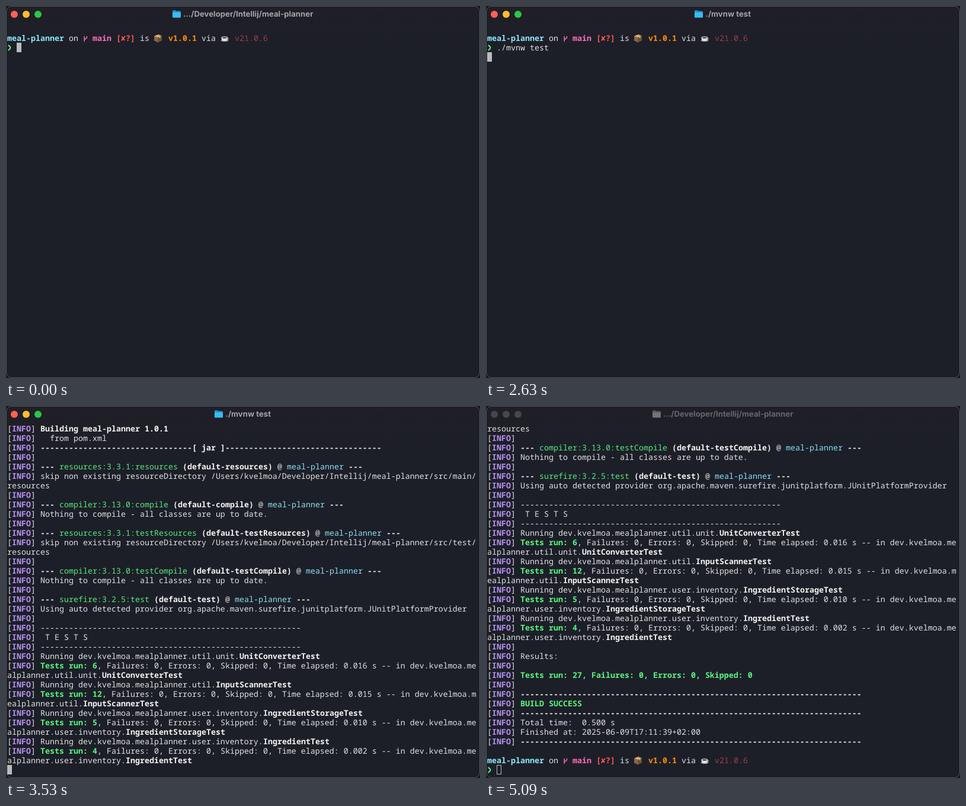
An HTML page that plays this animation: 800 by 628 pixels, repeating every 5140 ms.

```html
<!DOCTYPE html>
<html lang="en">
<head>
<meta charset="utf-8">
<title>Terminal test run</title>
<style>
  html, body { margin: 0; width: 100%; height: 100%; overflow: hidden; background: #15161b; }
  svg { display: block; width: 100vw; height: 100vh; }
  text { white-space: pre; text-rendering: geometricPrecision; font-variant-ligatures: none; }
  #term text { font: 13.3333px "Noto Sans Mono", "DejaVu Sans Mono", monospace; }
  #term text.bold { font-weight: 600; }
  #title { font: 700 13.2px Inter, "Open Sans", sans-serif; text-anchor: middle; }
</style>
</head>
<body>
<svg viewBox="0 0 800 628" xmlns="http://www.w3.org/2000/svg">
  <defs>
    <linearGradient id="bg" x1="0" y1="0" x2="0" y2="1">
      <stop offset="0" stop-color="#201e27"/>
      <stop offset=".1" stop-color="#1d1f28"/>
    </linearGradient>
    <g id="branch" fill="none" stroke="#ff6ac1" stroke-width="1.5">
      <path d="M132.2 51V60M136.5 51V52.5Q136.5 55 132.2 56.5"/>
    </g>
    <g id="parcel">
      <path d="M250 51 257 48 263 50.5V58L256.5 61.5 250 58.5Z" fill="#8a6543"/>
      <path d="M250 51 257 48 263 50.5 256.5 53.5Z" fill="#c69c6d"/>
      <path d="M256.5 53.5 263 50.5V58L256.5 61.5Z" fill="#6d4c31"/>
      <path d="M253 49.7 259.8 52V54.5" fill="none" stroke="#e2cba6" stroke-width="1.2"/>
    </g>
    <g id="cup">
      <ellipse cx="369" cy="58" rx="6.5" ry="2" fill="#a7a8a8"/>
      <path d="M363.5 53.5H374Q374 59 368.8 59T363.5 53.5Z" fill="#e4e4e2"/>
      <ellipse cx="368.8" cy="53.5" rx="5.3" ry="2.3" fill="#e4e4e2"/>
      <ellipse cx="368.8" cy="53.6" rx="3.9" ry="1.3" fill="#4b4743"/>
      <path d="M373.5 54Q376 54 375.5 55.5T372.8 57" fill="none" stroke="#d0d0ce"/>
    </g>
  </defs>
  <rect x=".5" y=".5" width="799" height="627" rx="9" fill="url(#bg)" stroke="#53555b"/>
  <circle class="light" cx="14" cy="14" r="6"/>
  <circle class="light" cx="34" cy="14" r="6"/>
  <circle class="light" cx="54" cy="14" r="6"/>
  <g id="folder">
    <path id="folderBack" d="M281 8.6Q281 7.2 282.4 7.2H286L287.5 8.6H293.6Q295 8.6 295 10V18.2Q295 19.6 293.6 19.6H282.4Q281 19.6 281 18.2Z"/>
    <path id="folderFront" d="M281 10.8H295V18.2Q295 19.6 293.6 19.6H282.4Q281 19.6 281 18.2Z"/>
  </g>
  <text id="title" x="408.8" y="18"></text>
  <g id="term"></g>
  <rect id="cursor"/>
</svg>
<script>
const LOOP = 5140, CELL = 8, LINE = 16, LEFT = 2, TOP = 30, COLS = 99, ROWS = 37;
const NS = "http://www.w3.org/2000/svg";
const $ = id => document.getElementById(id);

// Style keys: upper case is bold.
const COLORS = {
  w: "#e0e0e2", W: "#f3f3f1", c: "#87dff2", C: "#8be9fd", g: "#52ea7b", G: "#55f780",
  P: "#b791f2", M: "#ff6ac1", R: "#ff5555", O: "#ff8c0a", d: "#a03f4b"
};

const command = "./mvnw test";
const user = "kvelmoa";
const dash = n => "-".repeat(n);
const info = (s = "") => "§w[§PINFO§w] " + s;
const rule = info("§W" + dash(72));
const testRule = info(dash(55));
const prompt = "§Cmeal-planner§w on   §Mmain §R[✘?]§w is    §Ov1.0.1§w via    §dv21.0.6";
const goal = (name, id) => info(`§W--- §g${name}§W (${id})§w @ §cmeal-planner§W ---`);
const skip = dir => info(`skip non existing resourceDirectory /Users/${user}/Developer/Intellij/meal-planner/src/${dir}/resources`);
const idle = info("Nothing to compile - all classes are up to date.");
const suite = (pkg, name, count, secs) => {
  const path = `dev.${user}.mealplanner.${pkg}.§W${name}`;
  return [
    info("Running " + path),
    info(`§GTests run: ${count}§w, Failures: 0, Errors: 0, Skipped: 0, Time elapsed: ${secs} s -- in ${path}`)
  ];
};

const log = [
  "", prompt, "",
  info("Scanning for projects..."),
  info(),
  info(`§W${dash(22)}< §cdev.${user}:meal-planner§W >${dash(22)}`),
  info("§WBuilding meal-planner 1.0.1"),
  info("  from pom.xml"),
  info(`§W${dash(32)}[ jar ]${dash(33)}`),
  info(),
  goal("resources:3.3.1:resources", "default-resources"),
  skip("main"),
  info(),
  goal("compiler:3.13.0:compile", "default-compile"),
  idle,
  info(),
  goal("resources:3.3.1:testResources", "default-testResources"),
  skip("test"),
  info(),
  goal("compiler:3.13.0:testCompile", "default-testCompile"),
  idle,
  info(),
  goal("surefire:3.2.5:test", "default-test"),
  info("Using auto detected provider org.apache.maven.surefire.junitplatform.JUnitPlatformProvider"),
  info(),
  testRule,
  info(" T E S T S"),
  testRule,
  ...suite("util.unit", "UnitConverterTest", 6, "0.016"),
  ...suite("util", "InputScannerTest", 12, "0.015"),
  ...suite("user.inventory", "IngredientStorageTest", 5, "0.010"),
  ...suite("user.inventory", "IngredientTest", 4, "0.002"),
  info(),
  info("Results:"),
  info(),
  info("§GTests run: 27, Failures: 0, Errors: 0, Skipped: 0"),
  info(),
  rule,
  info("§GBUILD SUCCESS"),
  rule,
  info("Total time:  0.500 s"),
  info("Finished at: 2025-06-09T17:11:39+02:00"),
  rule,
  "", prompt, ""
];

function add(parent, tag, attrs = {}, content = "") {
  const el = document.createElementNS(NS, tag);
  for (const k in attrs) el.setAttribute(k, attrs[k]);
  el.textContent = content;
  return parent.appendChild(el);
}

function addText(row, col, style, content) {
  return add(row, "text", {
    x: LEFT + col * CELL, y: 13, fill: COLORS[style],
    class: style < "a" ? "bold" : ""
  }, content);
}

const rows = [];
const newRow = () => {
  const g = add($("term"), "g");
  rows.push(g);
  return g;
};

// Lay out one styled line, wrapping at the terminal width.
function addLine(line) {
  let row = newRow(), col = 0, style = "w";
  line.split(/§(.)/).forEach((part, i) => {
    if (i % 2) { style = part; return; }
    while (part) {
      if (col === COLS) { row = newRow(); col = 0; }
      const piece = part.slice(0, COLS - col);
      if (piece.trim()) addText(row, col, style, piece);
      col += piece.length;
      part = part.slice(piece.length);
    }
  });
  if (line === prompt) {
    for (const id of ["branch", "parcel", "cup"])
      add(row, "use", { href: "#" + id, y: -TOP - LINE });
  }
}
log.forEach(addLine);

const INPUT = 2, LAST = rows.length - 1;
for (const r of [INPUT, LAST])
  add(rows[r], "path", { d: "M3.6 4.2Q7.4 6.5 7.4 8.5T3.6 12.8", fill: "none", stroke: COLORS.G, "stroke-width": 2 });
const typedText = addText(rows[INPUT], 2, "w", "");

const keyTimes = [570, 670, 970, 1100, 1170, 1330, 1570, 2070, 2170, 2300, 2430];
// [time, row of the cursor]
const output = [
  [0, INPUT], [2600, 3], [2870, 4], [3030, 10], [3100, 11], [3170, 14], [3200, 17],
  [3270, 21], [3300, 24], [3330, 27], [3370, 30], [3400, 31], [3430, 34],
  [3470, 37], [3500, 40], [3530, 42], [3570, 46], [3600, LAST]
];
const BLUR = 5030;
const lights = [...document.querySelectorAll(".light")];
const lightColors = ["#ff5f57", "#febc2e", "#28c840"];

function set(el, attrs) {
  for (const k in attrs) el.setAttribute(k, attrs[k]);
}

function draw(t) {
  const typed = keyTimes.filter(k => k <= t).length;
  const current = output.filter(s => s[0] <= t).pop()[1];
  const scroll = Math.max(0, current - ROWS + 1);
  const focused = t < BLUR;
  const running = t >= 2630 && t < 3630;

  typedText.textContent = command.slice(0, typed);
  rows.forEach((row, r) => {
    const shown = r >= scroll && (r < current || r === INPUT || current === LAST);
    set(row, {
      display: shown ? "inline" : "none",
      transform: `translate(0 ${TOP + (r - scroll) * LINE})`
    });
  });

  const col = current === INPUT ? 2 + typed : current === LAST ? 2 : 0;
  const inset = focused ? 0 : 0.5;
  set($("cursor"), {
    x: LEFT + col * CELL + inset, y: TOP + (current - scroll) * LINE + inset,
    width: CELL - 2 * inset, height: LINE - 2 * inset,
    fill: focused ? "#bbbbbd" : "none", stroke: focused ? "none" : "#bbbbbd"
  });

  lights.forEach((l, i) => set(l, { fill: focused ? lightColors[i] : "#46464c" }));
  $("title").textContent = running ? command : ".../Developer/Intellij/meal-planner";
  set($("title"), { fill: focused ? "#a3a4aa" : "#66676d" });
  set($("folder"), { transform: `translate(${running ? 71 : 0} 0)` });
  set($("folderBack"), { fill: focused ? "#1795d0" : "#55565a" });
  set($("folderFront"), { fill: focused ? "#37bdf3" : "#737478" });
}

function tick() {
  draw(performance.now() % LOOP);
  requestAnimationFrame(tick);
}
tick();
</script>
</body>
</html>
```
